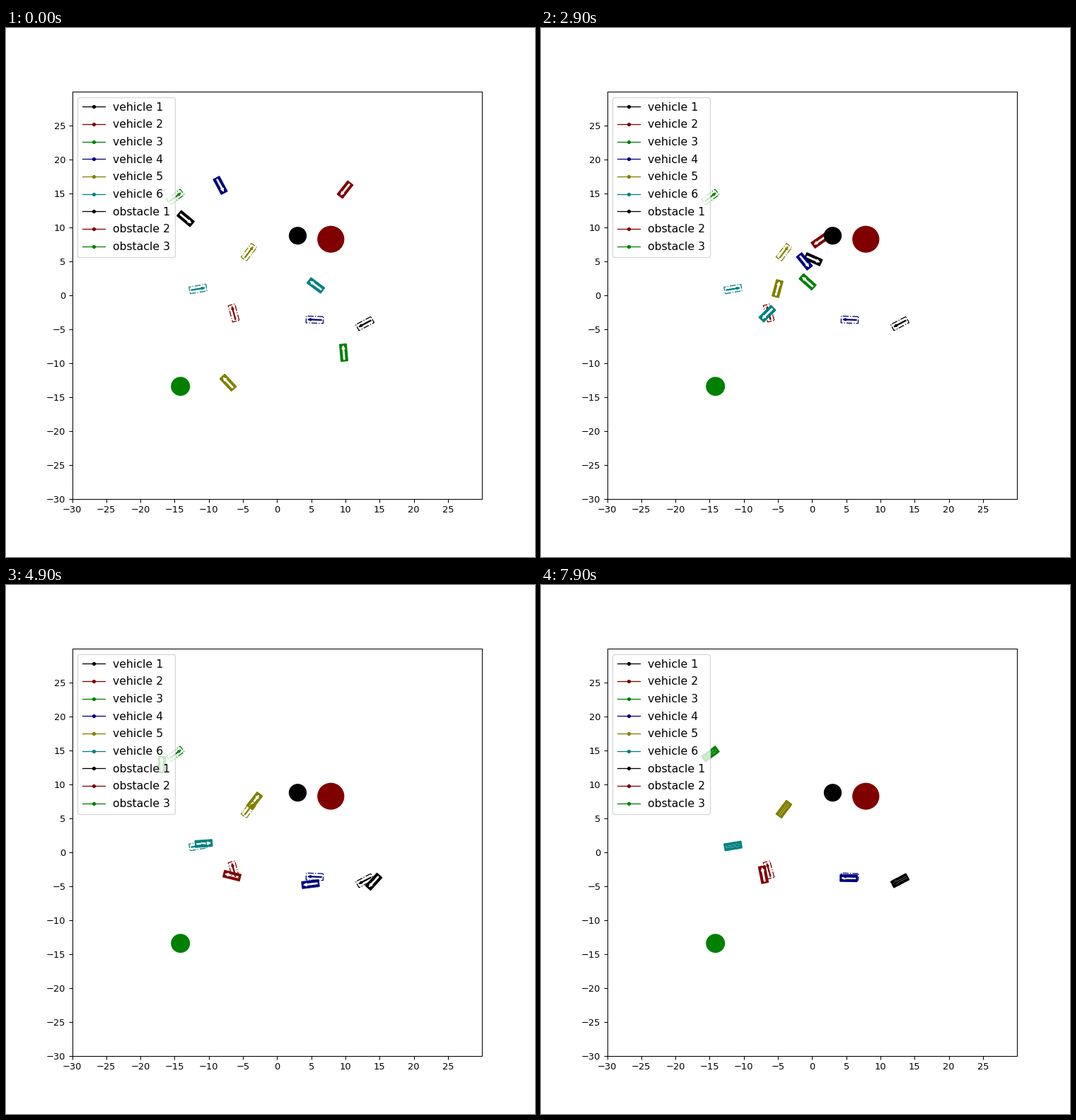
Animation of 748 by 748 pixels, one loop 8000 ms. Source, as a matplotlib script:

```python
import numpy as np
import matplotlib.pyplot as plt
from matplotlib.animation import FuncAnimation
from matplotlib.patches import Circle, FancyArrow, Rectangle
from matplotlib.transforms import Affine2D

FRAMES, INTERVAL = 80, 100
STAGE, DPI = 748, 93.5
COLORS = ["black", "maroon", "green", "navy", "olive", "teal"]
LENGTH, WIDTH = 2.5, 1.0
ACCEL = 0.38                      # pixels per step squared
TIMES = [17, 28, 39, 48, 63, 78]  # launch end, cruise, turn, overshoot, parked

fig = plt.figure(figsize=(STAGE / DPI, STAGE / DPI), dpi=DPI)
ax = fig.add_axes([0.125, 0.11, 0.775, 0.77])
ax.set_xlim(-30, 30)
ax.set_ylim(-30, 30)
ax.set_xticks(np.arange(-30, 30, 5))
ax.set_yticks(np.arange(-30, 30, 5))


def to_data(x, y):
    """Stage pixels (origin top left) to axis units."""
    u = (x / STAGE - 0.125) / 0.775
    v = (1 - y / STAGE - 0.11) / 0.77
    return 60 * u - 30, 60 * v - 30


def ahead(heading):
    a = np.radians(heading)
    return np.array([np.cos(a), -np.sin(a)])


def hermite(s, h, p0, p1, m0, m1):
    return ((1 + 2 * s) * (1 - s) ** 2 * p0 + s * s * (3 - 2 * s) * p1
            + h * s * (1 - s) * ((1 - s) * m0 - s * m1))


def place(patches, x, y, heading):
    pose = Affine2D().rotate_deg(heading).translate(*to_data(x, y))
    for p in patches:
        p.set_transform(pose + ax.transData)


def car_patches(color, arrow_color, shaft, head, **style):
    box = Rectangle((-LENGTH / 2, -WIDTH / 2), LENGTH, WIDTH,
                    ec=color, lw=1, **style)
    arrow = FancyArrow(-1, 0, 2, 0, width=shaft, head_width=head,
                       head_length=0.45, length_includes_head=True,
                       color=arrow_color, lw=1)
    for p in (box, arrow):
        ax.add_patch(p)
    return box, arrow


class Car:
    """Launches at constant acceleration, then follows its heading
    through a few poses (x, y, heading) until it is parked."""

    def __init__(self, color, goal, start, aim, *poses):
        self.start, self.aim = start, aim
        keys = [self.launch(TIMES[0]), *poses]
        keys += [goal] * (len(TIMES) - len(keys))
        self.p = np.array(keys, float)
        self.m = self.slopes()
        self.patches = car_patches(color, "white", 0.16, 0.42, fc=color)
        place(car_patches(color, color, 0.1, 0.35, fc="none", ls="-."), *goal)

    def launch(self, step):
        x, y, h0 = self.start
        t = (np.arange(40) + 0.5) / 40 * step

        def heading(t):
            return h0 + (self.aim - h0) * np.sin(np.pi / 2 * t / TIMES[0])

        dx, dy = step * np.mean(ACCEL * t * ahead(heading(t)), axis=1)
        return x + dx, y + dy, heading(step)

    def slopes(self):
        """Velocity along the heading, backwards where the path reverses."""
        m = np.gradient(self.p, TIMES, axis=0)
        m[0, 2] = 0
        m[-2:] = 0
        m[0, :2] = ACCEL * TIMES[0] * ahead(self.aim)
        chords = np.diff(self.p[:, :2], axis=0)
        speed = np.hypot(*chords.T) / np.diff(TIMES)
        for i in range(1, len(TIMES) - 2):
            way = ahead(self.p[i, 2])
            gear = np.sign(way @ (chords[i - 1] + chords[i]))
            m[i, :2] = gear * (speed[i - 1] + speed[i]) / 2 * way
        return m

    def pose(self, step):
        if step < TIMES[0]:
            return self.launch(step)
        i = min(np.searchsorted(TIMES, step, side="right"), len(TIMES) - 1) - 1
        h = TIMES[i + 1] - TIMES[i]
        return hermite((step - TIMES[i]) / h, h, self.p[i], self.p[i + 1],
                       self.m[i], self.m[i + 1])


cars = [
    Car("black", (507.5, 418, -152), (254, 269.5, -40), -20,
        (385, 327, -24), (481, 387, -25), (520, 419.5, -132),
        (493, 426.5, -157)),
    Car("maroon", (322, 403, 105), (479.5, 228.5, 232), 221,
        (394.5, 300.5, 215), (338, 369, 264), (319.5, 411, 166),
        (306, 401, 120), (314.5, 409.5, 101)),
    Car("green", (239.5, 239, 37), (477.5, 459, 95), 140,
        (377, 359, 138), (285, 284, 148), (220, 253.5, 90),
        (254, 231.5, 38)),
    Car("navy", (436.5, 412.5, 178), (303, 222.5, -62), -63,
        (372.5, 330, -51), (438, 391.5, -51), (430.5, 423, -173),
        (435.5, 417.5, -155), (435, 414.5, -181)),
    Car("olive", (343.5, 317, 53), (314, 501.5, 133), 85,
        (334.5, 368.5, 75), (346, 313, 57), (351.5, 305, 52)),
    Car("teal", (271.5, 369, 9.5), (438, 364, 143), 185,
        (320, 404, 225), (260, 383, 84), (279.5, 365.5, 4)),
]

obstacles = [(412.5, 293.7, 1.24), (459.3, 298.7, 1.91), (246.7, 506.7, 1.33)]
for (x, y, r), color in zip(obstacles, COLORS):
    ax.add_patch(Circle(to_data(x, y), r, color=color))

for kind, count in (("vehicle", len(cars)), ("obstacle", len(obstacles))):
    for i in range(count):
        ax.plot([], [], ".-", lw=1, color=COLORS[i], label=f"{kind} {i + 1}")
ax.legend(loc="upper left", fontsize=12, labelspacing=0.62,
          borderpad=0.46, handletextpad=0.72)


def update(frame):
    step = max(frame - 1, 0)
    for car in cars:
        place(car.patches, *car.pose(step))
    return [p for car in cars for p in car.patches]


anim = FuncAnimation(fig, update, frames=FRAMES, interval=INTERVAL,
                     repeat=True, repeat_delay=0, blit=False)
plt.show()
```
